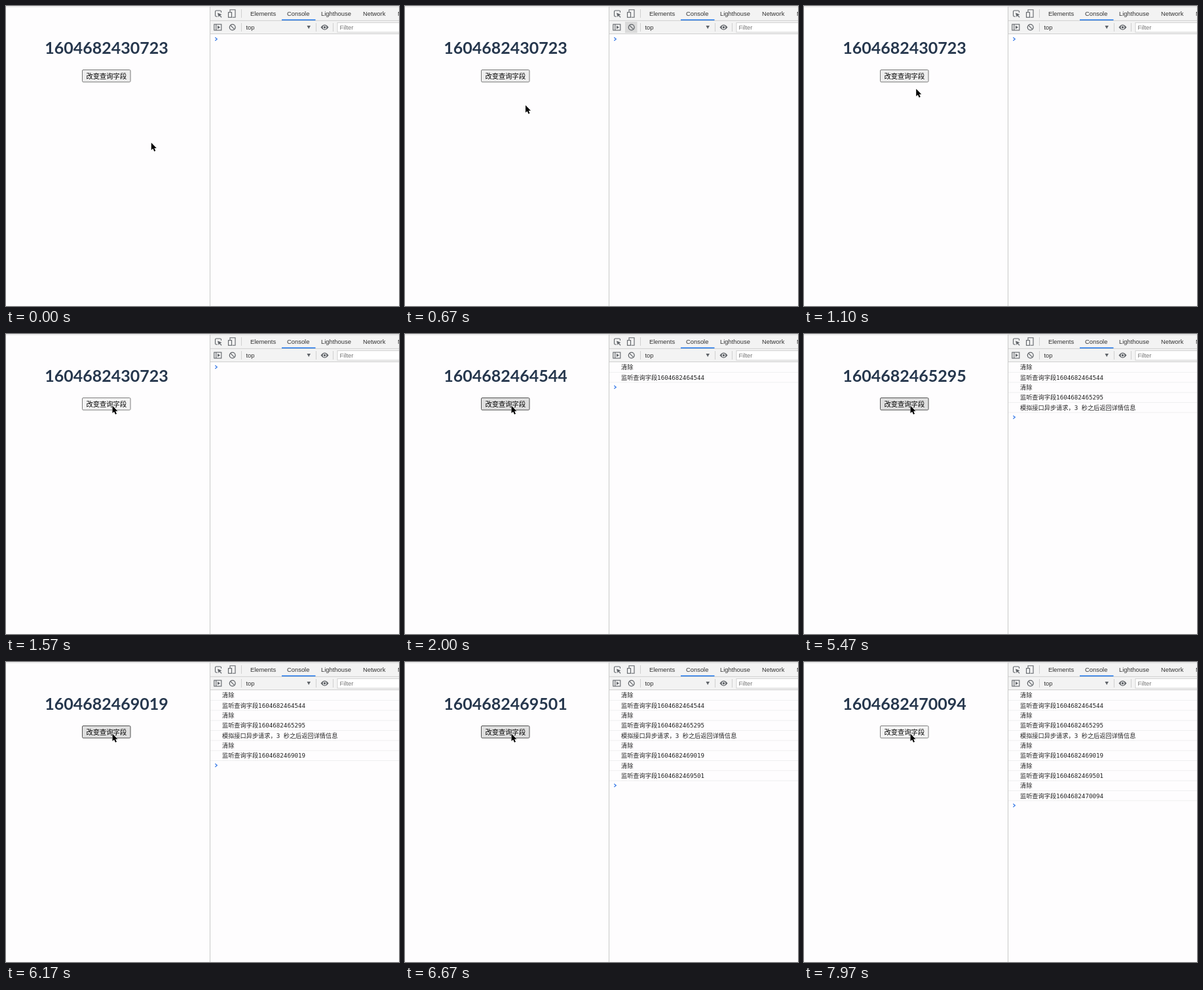
Write an HTML page that moves like this. It is 600 px wide and 458 px high and loops after 8000 ms.

```html
<!DOCTYPE html>
<html lang="zh-CN">
<head>
<meta charset="utf-8">
<style>
  html, body { margin: 0; width: 100%; height: 100%; overflow: hidden; background: #fefdfe; }
  svg { display: block; width: 600px; height: 458px; }
  .ui { font: 9.4px "Liberation Sans", Arial, sans-serif; fill: #333; }
  .log { font: 9.2px "DejaVu Sans Mono", "Noto Sans CJK SC", "Noto Sans CJK", monospace; fill: #222; }
  .title { font: 700 25px Lato, sans-serif; fill: #26374d; text-anchor: middle; }
  .label { font: 10.3px "Noto Sans CJK SC", "Noto Sans CJK", sans-serif; text-anchor: middle; }
  .icon { fill: none; stroke: #5f6368; stroke-width: 1.1; }
</style>
</head>
<body>
<svg viewBox="0 0 600 458">
  <rect width="600" height="458" fill="#fefdfe"/>
  <path d="M0 1H311" stroke="#dcdcdc"/>

  <text id="title" class="title" x="153.5" y="72.5"></text>
  <rect id="button" x="116.5" y="97.5" width="73.5" height="18.5" rx="1.5"/>
  <text class="label" x="153.3" y="110.6">改变查询字段</text>

  <!-- developer tools -->
  <rect x="311" y="1" width="289" height="41.5" fill="#f3f3f3"/>
  <path d="M311 1H600M311 22.3H600M311 42.5H600" stroke="#cfcfcf"/>
  <path d="M311.5 1V458" stroke="#c9c9c9"/>
  <path d="M359.5 5V18M359.5 26V39M473.5 26V39M499.5 26V39" stroke="#d0d0d0"/>
  <path d="M421 21.3H472.5" stroke="#1a73e8" stroke-width="1.6"/>
  <g class="ui">
    <text x="373" y="14.8">Elements</text>
    <text x="429" y="14.8">Console</text>
    <text x="481" y="14.8">Lighthouse</text>
    <text x="545" y="14.8">Network</text>
    <text x="598" y="14.8">Memory</text>
    <text x="366.5" y="35.8">top</text>
  </g>
  <rect x="506" y="25.5" width="100" height="14.5" fill="#fff" stroke="#d2d2d2"/>
  <text class="ui" x="509.5" y="36" style="fill:#757575">Filter</text>
  <rect id="hover" x="336" y="24" width="18.5" height="17" fill="#dadada"/>
  <g class="icon">
    <path d="M323 16H321Q319.5 16 319.5 14.5V8.5Q319.5 7 321 7H327Q328.5 7 328.5 8.5V10"/>
    <path d="M323 10.5L329.5 13L327 14L329.5 17L328.5 17.8L326 14.8L324.6 17Z" fill="#5f6368" stroke="none"/>
    <path d="M342 9V5.8H350V17.3H345.5"/>
    <rect x="339.5" y="9.7" width="5" height="7.6"/>
    <rect x="317.8" y="28" width="11" height="9"/>
    <path d="M320.8 28V37"/>
    <path d="M323 30L327 32.5L323 35Z" fill="#5f6368" stroke="none"/>
    <circle cx="345.7" cy="32.5" r="4.4" stroke-width="1.3"/>
    <path d="M342.6 29.4L348.8 35.6" stroke-width="1.3"/>
    <path d="M459.5 30H465L462.2 35Z" fill="#5f6368" stroke="none"/>
    <path d="M480.5 32.5Q486.5 24.5 492.5 32.5Q486.5 40.5 480.5 32.5Z" fill="#5f6368" stroke="none"/>
    <circle cx="486.5" cy="32.5" r="2.3" fill="#5f6368" stroke="#f3f3f3"/>
  </g>

  <g id="rows"></g>
  <path id="prompt" d="M319.3 -2.4L322.2 0L319.3 2.4" fill="none" stroke="#3b7de8" stroke-width="1.3"/>
  <path id="cursor" d="M0 0V11.2L2.6 8.9L4.5 13.2L6.5 12.3L4.6 8.2H8Z" stroke="#fff" stroke-width="1" paint-order="stroke"/>
</svg>
<script>
const LOOP = 8000, PITCH = 15.32;
const $ = id => document.getElementById(id);

// press time, release time, resulting value
const clicks = [
  [1560, 1700, '1604682464544'],
  [2330, 2430, '1604682465295'],
  [6000, 6100, '1604682469019'],
  [6500, 6660, '1604682469501'],
  [7030, 7160, '1604682470094'],
  [7960, 8100, '']
];
const log = clicks.flatMap(([, at, value]) => [[at, '清除'], [at, '监听查询字段' + value]]);
log.push([5465, '模拟接口异步请求，3 秒之后返回详情信息']);
log.sort((a, b) => a[0] - b[0]);

const rows = log.filter(([at]) => at < LOOP).map(([at, text], i) => {
  const y = i * PITCH;
  $('rows').insertAdjacentHTML('beforeend',
    `<g><path d="M312 ${y + 58.6}H600" stroke="#efeff0"/><text class="log" x="330" y="${y + 54.3}">${text}</text></g>`);
  return { at, node: $('rows').lastChild };
});

// start, end, from, to
const moves = [
  [0, 370, [222, 209], [184, 151.5]],
  [840, 1560, [184, 151.5], [162.5, 109.5]]
];
function cursorAt(t) {
  const [start, end, from, to] = moves[t < moves[1][0] ? 0 : 1];
  const p = Math.min(1, (t - start) / (end - start));
  const ease = 1 - (1 - p) ** 2;
  return from.map((v, i) => v + (to[i] - v) * ease);
}

function draw(t) {
  const [x, y] = cursorAt(t);
  $('cursor').setAttribute('transform', `translate(${x} ${y})`);

  const done = clicks.filter(c => t >= c[1]);
  $('title').textContent = done.length ? done[done.length - 1][2] : '1604682430723';

  const pressed = clicks.some(([down, up]) => t >= down && t < up);
  const over = y < 116;
  const [fill, stroke] = pressed ? ['#f4f4f4', '#7d7d7d'] : over ? ['#dfdfdf', '#4f4f4f'] : ['#eeeeee', '#767676'];
  $('button').setAttribute('fill', fill);
  $('button').setAttribute('stroke', stroke);
  $('hover').style.display = t >= 630 && t < 870 ? '' : 'none';

  let count = 0;
  for (const { at, node } of rows) {
    const shown = t >= at;
    node.style.display = shown ? '' : 'none';
    count += shown;
  }
  $('prompt').setAttribute('transform', `translate(0 ${50.5 + count * PITCH})`);
}

const begin = performance.now();
function tick() {
  draw((performance.now() - begin) % LOOP);
  requestAnimationFrame(tick);
}
tick();
</script>
</body>
</html>
```
